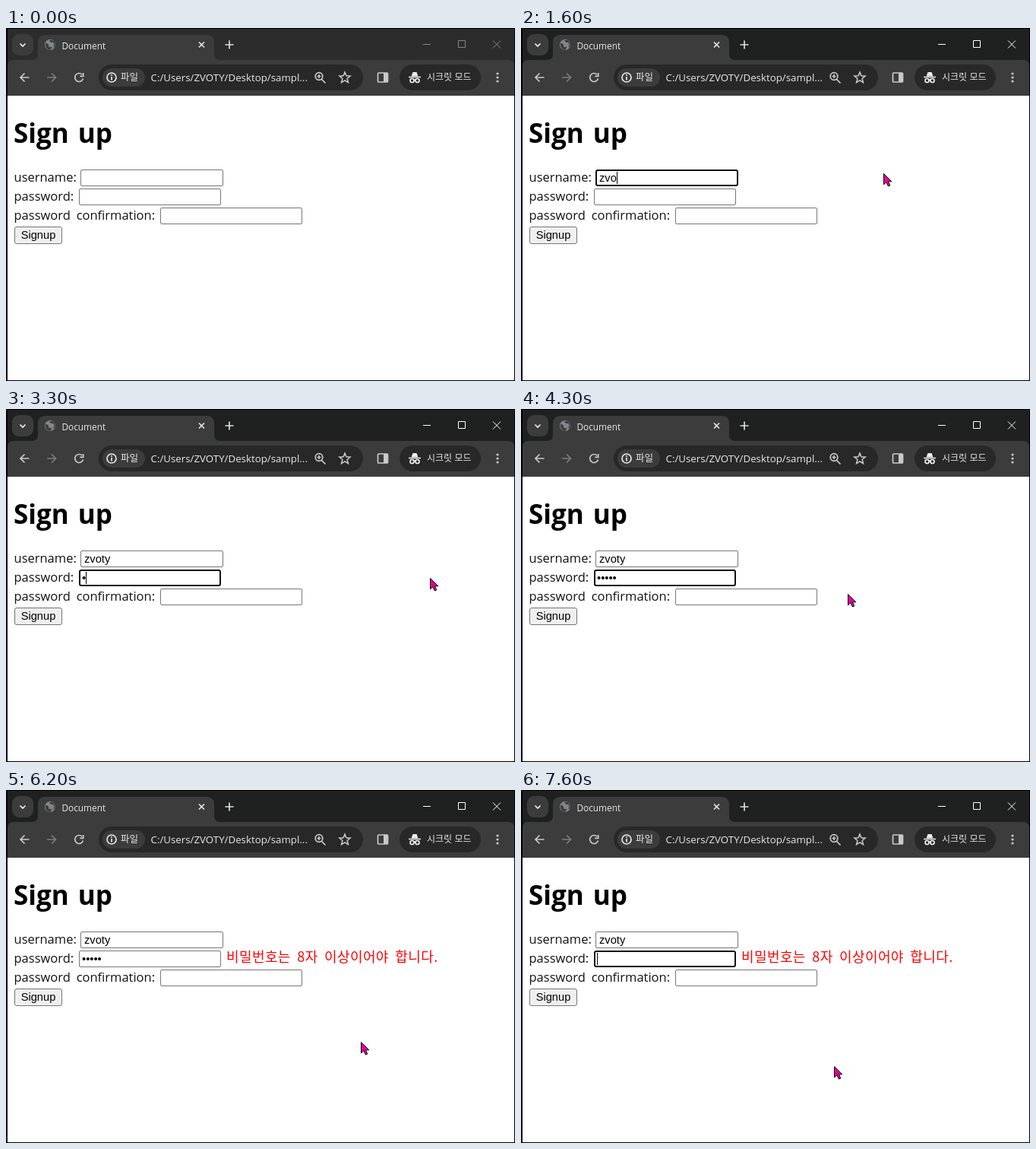
An HTML page for the animation above (8 s loop, 670 by 464 pixels).

```html
<!DOCTYPE html>
<html lang="ko">
<head>
<meta charset="utf-8">
<title>Sign up</title>
<style>
  html, body { margin: 0; width: 100%; height: 100%; overflow: hidden; background: #000; }
  svg { display: block; width: 670px; height: 464px; }
  text { white-space: pre; }
  .ui { font-family: "Open Sans", "Noto Sans", sans-serif; fill: #e8e8e8; }
  .ko { font-family: "Noto Sans CJK KR", "Noto Sans CJK", sans-serif; }
  .label { font: 16.5px "Open Sans", "Noto Sans", sans-serif; fill: #111; word-spacing: 3.5px; }
  .control { font: 14.67px "Liberation Sans", Arial, sans-serif; fill: #000; }
  .icon { fill: none; stroke: #c9c9c9; stroke-width: 1.7; }
</style>
</head>
<body>
<svg viewBox="0 0 670 464" xmlns="http://www.w3.org/2000/svg">
  <rect width="670" height="464" fill="#000"/>
  <rect id="titleBar" x="2" y="1" width="667" height="60"/>

  <!-- tab strip -->
  <rect x="8" y="8" width="28" height="28" rx="9" fill="#3c3c3c"/>
  <path d="M18.5 20.5l3.5 3.5 3.5-3.5" class="icon" style="stroke:#eee"/>
  <path d="M34 42q8 0 8-8V19q0-10 10-10H264q10 0 10 10V34q0 8 8 8z" fill="#3c3c3c"/>
  <circle cx="58" cy="22" r="7" fill="#80868b"/>
  <path d="M52 20q4 0 4 3t3 2-1 4q-5-1-6-6zM57 16q1 3 4 3t2 4 1 2q2-6-3-9z" fill="#3c3c3c"/>
  <text x="73.5" y="28" class="ui" font-size="11.8">Document</text>
  <path d="M254 18.5l7 7m0-7l-7 7" class="icon" style="stroke:#e4e4e4"/>
  <path d="M288.500 22h11M294 16.500v11" class="icon" style="stroke:#ddd"/>
  <path id="captions" d="M549 21.5h10M595.500 16.500h9v9h-9zM641 16.500l10 10m0-10l-10 10" fill="none"/>

  <!-- toolbar -->
  <path d="M2 89V50q0-8 8-8H661q8 0 8 8V89z" fill="#3c3c3c"/>
  <path d="M30.500 65H19m5.500-5.500L19 65l5.500 5.500" class="icon"/>
  <path d="M54 65h11.500m-5.500-5.500l5.500 5.500-5.500 5.500" class="icon" style="stroke:#7c7c7c"/>
  <path d="M100.200 61.200A5.500 5.500 0 1 0 101.500 66.500M101.700 59v4.300h-4.500" class="icon"/>
  <rect x="122" y="48" width="348" height="34" rx="17" fill="#282828"/>
  <rect x="127" y="53" width="56" height="24" rx="12" fill="#3c3c3c"/>
  <circle cx="139" cy="65" r="6" class="icon" style="stroke:#e8e8e8"/>
  <path d="M139 64v4.500M139 61v1.700" class="icon" style="stroke:#e8e8e8"/>
  <text x="151" y="69" class="ui ko" font-size="12.500">파일</text>
  <text x="190.500" y="70" class="ui" font-size="13.300">C:/Users/ZVOTY/Desktop/sampl...</text>
  <path d="M415.200 67.200l5.300 5.300M409.500 63.500h5M412 61v5" class="icon"/>
  <circle cx="412" cy="63.500" r="4.800" class="icon"/>
  <path id="star" class="icon" style="stroke-width:1.5"/>
  <rect x="489.500" y="59" width="13" height="12" rx="1" class="icon"/>
  <rect x="497" y="59" width="6" height="12" fill="#c9c9c9"/>
  <rect x="518" y="48" width="107" height="34" rx="17" fill="#282828"/>
  <path d="M533.500 63.500l2-5.500h5l2 5.500z" fill="#eee"/>
  <path d="M530 64.500h16M536.500 68.500q1.500-1 3 0" class="icon" style="stroke:#eee"/>
  <g class="icon" style="stroke:#eee"><circle cx="534.500" cy="69" r="2.500"/><circle cx="541.500" cy="69" r="2.500"/></g>
  <text x="554" y="69" class="ui ko" font-size="12">시크릿 모드</text>
  <g fill="#c9c9c9"><circle cx="647" cy="60" r="1.600"/><circle cx="647" cy="65" r="1.600"/><circle cx="647" cy="70" r="1.600"/></g>

  <!-- page -->
  <rect x="2" y="89" width="667" height="374" fill="#fff"/>
  <text x="10" y="151" font-family="Open Sans, Noto Sans, sans-serif" font-size="35" font-weight="700" word-spacing="3">Sign up</text>
  <text x="10.500" y="202" class="label">username:</text>
  <text x="10.500" y="227" class="label">password:</text>
  <text x="10.500" y="252" class="label">password confirmation:</text>
  <g id="fields"></g>
  <rect x="11.500" y="261.500" width="62" height="22" rx="2.500" fill="#efefef" stroke="#767676"/>
  <text x="19.700" y="277" class="control">Signup</text>
  <text id="warning" x="290" y="226" class="ko" font-size="18" font-weight="300" fill="#f00" letter-spacing=".4" word-spacing="3">비밀번호는 8자 이상이어야 합니다.</text>
  <rect id="caret" width="1" height="16" fill="#000"/>
  <path id="arrow" d="M.5 .5V14.800L3.800 11.800 6.400 17 8.800 15.900 6.400 10.800H10.800z" fill="#e6009a" stroke="#000" stroke-linejoin="round"/>
  <path id="beam" d="M-4.500 -7H-1.500L0 -6 1.500 -7H4.500M0 -6V6M-4.500 7H-1.500L0 6 1.500 7H4.500" fill="none" stroke="#000" stroke-width="2"/>
</svg>
<script>
const LOOP = 8000;
const $ = id => document.getElementById(id);

function make(tag, attrs, parent) {
  const node = document.createElementNS("http://www.w3.org/2000/svg", tag);
  set(node, attrs);
  return parent.appendChild(node);
}
function set(node, attrs) {
  for (const key in attrs) node.setAttribute(key, attrs[key]);
}
const show = (node, on) => set(node, { visibility: on ? "visible" : "hidden" });
const moveTo = (node, x, y) => set(node, { transform: `translate(${x} ${y})` });

const starPoints = Array.from({ length: 10 }, (_, i) => {
  const angle = i * Math.PI / 5 - Math.PI / 2, r = i % 2 ? 3.3 : 7.5;
  return (446 + r * Math.cos(angle)).toFixed(1) + " " + (65.5 + r * Math.sin(angle)).toFixed(1);
});
set($("star"), { d: `M${starPoints.join("L")}z` });

function makeField(x, y, width, inset) {
  const box = make("rect", { fill: "#fff" }, $("fields"));
  const text = make("text", { x: x + inset, y: y + 16, class: "control" }, $("fields"));
  return { x, y, width, height: 22, inset, box, text };
}
const fields = {
  username: makeField(98, 186, 188, 5),
  password: makeField(96, 211, 187, 4),
  confirm: makeField(203, 236, 187, 4)
};

// Each track holds its latest value until the next entry.
const pointer = [
  [0, null],
  [100, "arrow", 516, 161], [200, "arrow", 474, 190], [300, "arrow", 340, 190], [400, "beam", 208, 192],
  [600, "beam", 283, 192], [700, "arrow", 440, 191], [900, "arrow", 477, 191],
  [2100, "arrow", 410, 198], [2200, "arrow", 295, 207], [2300, "beam", 183, 216],
  [2600, "arrow", 310, 217], [2700, "arrow", 470, 221], [2800, "arrow", 558, 222],
  [4200, "arrow", 515, 230], [4300, "arrow", 430, 243], [4400, "beam", 350, 250], [4500, "beam", 312, 252],
  [4800, "arrow", 410, 300], [4900, "arrow", 467, 331],
  [6300, "arrow", 410, 302], [6400, "arrow", 290, 250], [6500, "beam", 190, 222],
  [6800, "arrow", 280, 268], [6900, "arrow", 355, 325], [7000, "arrow", 398, 352], [7100, "arrow", 412, 363]
];
const focus = [[0, null], [600, "username"], [2500, "password"], [4700, "confirm"], [6100, null], [6700, "password"]];
const caretOff = [[3000, 3300], [4200, 4700], [5200, 5700], [7100, 7600]];
const nameKeys = [1000, 1200, 1600, 1800, 2100];
const passwordKeys = [3300, 3400, 3500, 3600, 3700];

const at = (track, t) => track.filter(entry => entry[0] <= t).pop();
const typed = (keys, t) => keys.filter(key => key <= t).length;

function drawField(field, focused, hovered) {
  const edge = focused ? 1 : 0.5;
  set(field.box, {
    x: field.x + edge, y: field.y + edge,
    width: field.width - 2 * edge, height: field.height - 2 * edge,
    rx: focused ? 2 : 1.5, "stroke-width": 2 * edge,
    stroke: focused ? "#101010" : hovered ? "#4f4f4f" : "#767676"
  });
}

function render(t) {
  const active = t >= 600;
  set($("titleBar"), { fill: active ? "#1f2020" : "#2c2c2c" });
  set($("captions"), { stroke: active ? "#fff" : "#858585" });

  fields.username.text.textContent = "zvoty".slice(0, typed(nameKeys, t));
  fields.password.text.textContent = t < 6700 ? "•".repeat(typed(passwordKeys, t)) : "";
  show($("warning"), t >= 4700);

  const [, kind, x, y] = at(pointer, t);
  const focusName = at(focus, t)[1];
  for (const name in fields) {
    const f = fields[name];
    const hovered = kind === "beam" && y >= f.y && y < f.y + f.height;
    drawField(f, name === focusName, hovered);
  }

  const target = fields[focusName];
  show($("caret"), target && !caretOff.some(([from, to]) => t >= from && t < to));
  if (target) {
    const offset = target.text.textContent ? target.text.getComputedTextLength() : 0;
    set($("caret"), { x: Math.round(target.x + target.inset + offset), y: target.y + 3 });
  }

  for (const name of ["arrow", "beam"]) {
    show($(name), kind === name);
    if (kind === name) moveTo($(name), x, y);
  }
}

const start = performance.now();
function tick() {
  render((performance.now() - start) % LOOP);
  requestAnimationFrame(tick);
}
tick();
</script>
</body>
</html>
```
